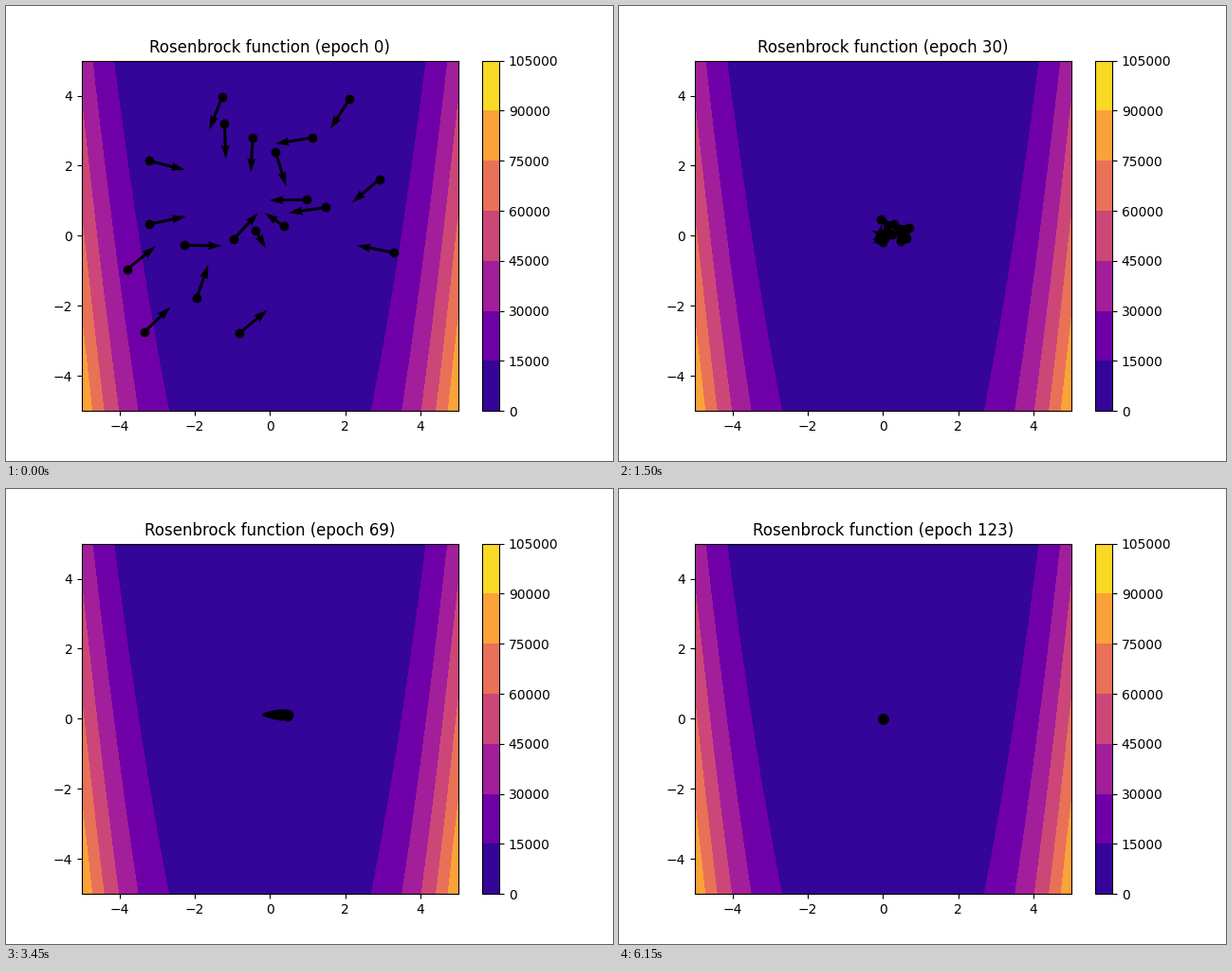
A matplotlib script for the animation above (6.2 s loop, 640 by 480 pixels).

```python
import numpy as np
import matplotlib.pyplot as plt
from matplotlib.animation import FuncAnimation

EPOCHS = 124
rng = np.random.default_rng(4)

# Initial particles: x, y, heading in degrees
SEEDS = np.array([
    (-1.27, 3.97, -110), (-1.21, 3.19, -88), (-.46, 2.81, -93),
    (.15, 2.38, -74), (1.12, 2.80, 190), (2.11, 3.90, 239),
    (2.92, 1.62, 222), (.98, 1.03, 181), (1.48, .81, 189),
    (.37, .27, 143), (-.38, .15, -62), (-.97, -.10, 49),
    (-2.28, -.27, -1), (-3.22, 2.14, -15), (-3.21, .33, 13),
    (-3.79, -.95, 41), (-3.34, -2.75, 46), (-1.95, -1.78, 72),
    (-.81, -2.78, 42), (3.28, -.48, 168)])
N = len(SEEDS)
omega = rng.uniform(0.7, 0.95, (N, 1))


def rosenbrock(x, y, a=0, b=100):
    return (a - x) ** 2 + b * (y - x ** 2) ** 2


def launch():
    """Fly along the headings, slower close to the minimum."""
    p, angle = SEEDS[:, :2], np.radians(SEEDS[:, 2:])
    speed = np.minimum(1, 1.4 * np.linalg.norm(p, axis=1, keepdims=True))
    return np.hstack([p, speed * np.cos(angle), speed * np.sin(angle)])


def gather():
    """Loose cluster along a diagonal, drifting to its centre."""
    centre = np.array([0.25, -0.2])
    along, across = rng.normal(0, (0.42, 0.2), (N, 2)).T
    p = centre + np.column_stack([along - across / 2, along / 2 + across])
    return np.hstack([p, 0.35 * (centre - p)])


def burst():
    """Ring of particles flying outwards."""
    theta = 2 * np.pi * np.arange(N) / N
    ring = np.column_stack([0.47 * np.cos(theta), 0.38 * np.sin(theta)])
    p = (0.2, 0.55) + ring * rng.uniform(0.85, 1.1, (N, 1))
    return np.hstack([p, 1.1 * (p - (0.35, 0.5))])


def cloud(low, high):
    """Random rows of x, y, vx, vy between two limits."""
    return rng.uniform(low, high, (N, 4))


# Key epochs with the swarm state (x, y, vx, vy) at each
POSES = [
    (0, launch()),
    (23, gather()),
    (38, burst()),
    (53, cloud((-.15, .1, -.85, -.25), (.5, .3, -.35, .05))),
    (69, cloud((.2, .06, -.6, -.08), (.5, .15, -.15, .05))),
    (97, cloud((-.03, -.03, -.03, -.02), (.12, .03, .03, .02))),
    (EPOCHS - 1, cloud(-.01, .01)),
]


def orbit(pose, t, w):
    """Oscillate around the minimum through the given state."""
    p, v = pose[:, :2], pose[:, 2:]
    c, s = np.cos(w * t), np.sin(w * t)
    return np.hstack([p * c + v / w * s, v * c - p * w * s])


def swarm(epoch):
    """Crossfade the orbits of the two neighbouring poses."""
    for (t0, a), (t1, b) in zip(POSES, POSES[1:]):
        if epoch <= t1:
            break
    u = (epoch - t0) / (t1 - t0)
    mix = u * u * (3 - 2 * u)
    w0 = 0.3 if t0 == 0 else omega
    state = (1 - mix) * orbit(a, epoch - t0, w0) + mix * orbit(b, epoch - t1, omega)
    pos, vel = state[:, :2], state[:, 2:]
    speed = np.linalg.norm(vel, axis=1, keepdims=True)
    return pos, vel / np.maximum(speed, 1)


fig, ax = plt.subplots(figsize=(6.4, 4.8), dpi=100)
x, y = np.meshgrid(np.linspace(-5, 5, 200), np.linspace(-5, 5, 200))
field = ax.contourf(x, y, rosenbrock(x, y), cmap="plasma")
fig.colorbar(field, ax=ax)

pos, vel = swarm(0)
dots, = ax.plot(*pos.T, "ko")
arrows = ax.quiver(*pos.T, *vel.T, color="black",
                   angles="xy", scale_units="xy", scale=1)
title = ax.set_title("Rosenbrock function (epoch 0)")
ax.set(xlim=(-5, 5), ylim=(-5, 5))


def update(epoch):
    pos, vel = swarm(epoch)
    dots.set_data(*pos.T)
    arrows.set_offsets(pos)
    arrows.set_UVC(*vel.T)
    title.set_text(f"Rosenbrock function (epoch {epoch})")
    return dots, arrows, title


anim = FuncAnimation(fig, update, frames=EPOCHS, interval=50,
                     repeat=True, repeat_delay=0, blit=False)
plt.show()
```
